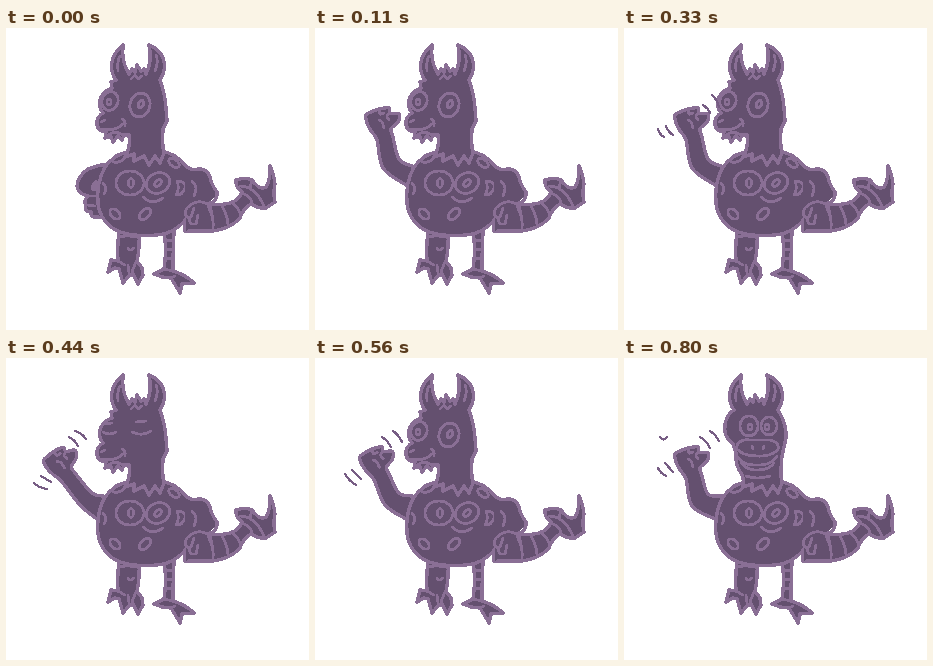
Write an HTML page that moves like this. It is 303 px wide and 302 px high and loops after 890 ms.

```html
<!DOCTYPE html>
<html lang="en">
<head>
<meta charset="utf-8">
<title>Waving creature</title>
<style>
html, body { margin: 0; width: 100%; height: 100%; overflow: hidden; background: #fff; }
svg { display: block; width: 100vw; height: 100vh; }
path, ellipse { fill: #64506f; stroke: #8a6f95; stroke-width: 3.4; stroke-linejoin: round; stroke-linecap: round; }
.line, .ring { fill: none; stroke-width: 2.8; }
.tick { fill: none; stroke: #775d84; stroke-width: 2.3; }
</style>
</head>
<body>
<svg viewBox="0 0 303 302" shape-rendering="crispEdges">
  <!-- tail -->
  <path d="M179 203H207Q224 201 234 190Q238 179 245 176Q253 181 260 180L269 174Q267 165 269 156Q268 146 264 138Q265 151 260 159Q254 163 246 152Q239 149 230 152Q229 159 236 164Q233 172 224 175Q212 178 200 176L179 186Z"/>
  <path class="line" d="M204 178Q208 191 207 202M216 178Q222 188 222 197M227 175Q234 182 235 188M236 165Q246 169 246 176M234 158Q249 158 258 178M246 152L244 160"/>
  <!-- legs -->
  <path d="M113 203Q111 220 112 233L105 232L102 244L109 240L113 241L117 255L123 248L127 246L132 256L137 247L136 240L131 233Q134 220 133 203Z"/>
  <path class="line" d="M112 209Q121 207 133 209M122 220Q124 224 128 220M112 233L119 237M126 244L130 234M122 237L123 245"/>
  <path d="M158 203Q161 222 158 241L148 246L156 249L165 250L174 265L176 256L188 255Q180 247 167 243Q167 222 168 203Z"/>
  <path class="line" d="M160 212L167 213M160 221L167 222M159 230L167 231M158 241L167 243M165 250L169 248"/>
  <!-- left arm -->
  <g id="hip">
    <path fill-rule="evenodd" d="M101 136Q92 137 82 141Q72 148 71 158Q72 166 82 168Q77 173 80 177Q78 184 85 184Q84 190 91 189L99 190ZM90 154Q86 157 87 161Q90 163 91 159Z"/>
    <path class="line" d="M82 168L91 168M81 177L89 178"/>
  </g>
  <g id="wave">
    <path id="arm"/>
    <path id="palm" class="line"/>
  </g>
  <!-- body -->
  <path d="M124 123Q107 127 99 139Q90 155 92 176Q95 196 114 204Q133 210 158 206Q177 200 184 184Q190 156 180 138Q170 125 154 123Z"/>
  <ellipse class="ring" cx="124" cy="155" rx="14" ry="12"/>
  <ellipse class="ring" cx="125" cy="155" rx="2.5" ry="4.5"/>
  <ellipse class="ring" cx="152" cy="155" rx="12" ry="10" transform="rotate(-25 152 155)"/>
  <ellipse class="ring" cx="152" cy="155" rx="4" ry="2.5" transform="rotate(-45 152 155)"/>
  <ellipse class="ring" cx="109" cy="186" rx="6" ry="4" transform="rotate(45 109 186)"/>
  <ellipse class="ring" cx="139" cy="186" rx="7" ry="4" transform="rotate(-45 139 186)"/>
  <ellipse class="ring" cx="113" cy="130" rx="7" ry="3.5" transform="rotate(-28 113 130)"/>
  <ellipse class="ring" cx="168" cy="135" rx="6" ry="3.5" transform="rotate(35 168 135)"/>
  <path class="line" d="M137 169Q146 178 157 170M97 155Q102 160 98 166M171 153Q180 153 179 160Q176 168 170 167Q174 160 171 153Z"/>
  <!-- right arm -->
  <path stroke="none" style="stroke:none" d="M179 139L200 142L211 166L202 176L190 195L180 203Z"/>
  <path style="fill:none" d="M180 138Q185 143 192 141Q201 140 204 149Q205 156 211 164Q212 173 202 176"/>
  <path class="line" d="M186 153Q193 159 188 168M202 176Q190 170 181 180Q176 188 184 190M184 190Q182 197 190 196L192 187M202 177L206 188M188 180L185 189"/>
  <!-- head -->
  <path id="head"/>
  <path class="line" d="M112 43Q111 33 114 28M149 43Q153 34 150 27"/>
  <g id="side">
    <path class="line" d="M95 94L99 92M92 101Q110 104 117 96M116 91Q120 93 119 98M102 107Q110 101 118 108M125 51L129 47L132 51L136 48"/>
    <g id="open">
      <ellipse class="ring" cx="104" cy="73" rx="8" ry="9.5" transform="rotate(20 104 73)"/>
      <ellipse class="ring" cx="103" cy="74" rx="2" ry="3"/>
      <ellipse class="ring" cx="134" cy="77" rx="10" ry="12" transform="rotate(15 134 77)"/>
      <ellipse class="ring" cx="135" cy="76" rx="2.5" ry="4" transform="rotate(20 135 76)"/>
    </g>
    <path id="shut" class="line" d="M97 74Q103 78 110 74M126 74Q136 79 145 73M99 66L106 65M130 64L140 63"/>
  </g>
  <g id="front">
    <ellipse class="ring" cx="125" cy="68" rx="9" ry="10"/>
    <ellipse class="ring" cx="145" cy="68" rx="8" ry="9"/>
    <ellipse class="ring" cx="126" cy="69" rx="2" ry="3"/>
    <ellipse class="ring" cx="143" cy="69" rx="2" ry="3"/>
    <path class="line" d="M112 90Q115 80 126 82L146 82Q156 84 154 92Q146 99 133 98Q118 98 112 90M128 88L129 91M140 88L139 91M113 98Q119 108 133 107Q147 108 153 98M117 105Q124 113 134 112Q145 112 150 105M122 118Q133 122 146 118"/>
  </g>
  <path id="ticks" class="tick"/>
</svg>
<script>
const $ = id => document.getElementById(id);
const LOOP = 890;

const crown = "M110 52C104 44 102 29 117 17C116 28 117 36 123 46L126 41L129 44L131 37L135 43L138 41L140 46C144 38 146 30 143 17C156 22 164 36 154 52";
const mane = "Q156 118 158 125L154 135L149 128L143 137L138 128L128 133L128 126L119 129";
const sideHead = crown + "Q159 65 160 80L161 93L157 101" + mane +
  "Q125 119 123 107L118 107L116 112L112 108L107 114L105 109L99 110L100 104Q90 103 91 93Q92 88 97 85Q91 78 95 69Q99 62 106 60L105 54Z";
const frontHead = crown + "Q163 66 162 80L158 98" + mane +
  "Q121 119 115 112Q111 104 112 95L109 86Q99 79 101 66Q103 56 110 52Z";

// wrist, hand angle, outer and inner elbow, motion marks
const poses = [
  { at: 0 },
  { at: 110, wrist: [70, 112], turn: 0, outer: [68, 140], inner: [84, 131] },
  { at: 220, wrist: [67, 112], turn: -13, outer: [71, 140], inner: [84, 127],
    ticks: "M70 68Q76 71 79 78M79 62Q85 65 88 71M33 107Q36 112 42 115M39 103L48 111" },
  { at: 330, wrist: [70, 112], turn: 0, outer: [68, 140], inner: [84, 131],
    ticks: "M34 101Q35 106 40 109M42 98Q44 104 49 107M79 77Q84 80 86 85M88 67Q93 71 95 79" },
  { at: 440, wrist: [63, 121], turn: -17, outer: [74, 147], inner: [86, 135], shut: true,
    ticks: "M63 79Q69 82 72 88M69 73Q76 75 80 81M28 125Q33 130 41 131M35 118L45 124" },
  { at: 560, wrist: [67, 121], turn: -8, outer: [70, 147], inner: [84, 135],
    ticks: "M67 79Q73 83 76 89M78 73Q84 77 87 84M30 116Q34 123 41 127M37 112L46 121" },
  { at: 670, wrist: [70, 121], turn: 0, outer: [68, 148], inner: [84, 136], front: true,
    ticks: "M76 79Q83 83 86 90M86 73Q92 77 95 83M34 110Q36 115 42 118M41 105L49 114M36 79Q39 84 43 79" }
];

const hand = [[-8, 0], [-14, -9], [-18, -17], [-19, -25], [-14, -28], [-6, -31],
  [4, -32], [5, -27], [14, -26], [13, -18], [6, -11], [8, -3]];
const creases = [[[-6, -31], [-5, -26], [-1, -27]], [[-6, -20], [-3, -18], [-1, -12]], [[5, -27], [2, -24], [4, -20]]];

const show = (id, on) => $(id).style.display = on ? "" : "none";

function place({ wrist: [x, y], turn }) {
  const a = turn * Math.PI / 180, c = Math.cos(a), s = Math.sin(a);
  return ([u, v]) => [x + u * c - v * s, y + u * s + v * c];
}

// smooth curve through every point
function curve(pts) {
  const at = i => pts[Math.max(0, Math.min(pts.length - 1, i))];
  const ease = (p, a, b) => p.map((v, k) => v + (b[k] - a[k]) / 6);
  return "M" + pts[0] + pts.slice(1).map((p, i) =>
    `C${ease(at(i), at(i - 1), p)} ${ease(p, at(i + 2), at(i))} ${p}`).join("");
}

function draw(p) {
  const waving = !!p.wrist;
  show("hip", !waving);
  show("wave", waving);
  show("side", !p.front);
  show("front", p.front);
  show("open", !p.shut);
  show("shut", p.shut);
  $("head").setAttribute("d", p.front ? frontHead : sideHead);
  $("ticks").setAttribute("d", p.ticks || "");
  if (!waving) return;
  const put = place(p);
  const drop = p.wrist[1] > 115 ? 4 : 0;
  $("arm").setAttribute("d", curve([[99, 160 + drop], [91, 157 + drop], p.outer, ...hand.map(put), p.inner, [97, 138], [104, 139]]) + "Z");
  $("palm").setAttribute("d", creases.map(line => curve(line.map(put))).join(""));
}

let current;
function tick() {
  const t = performance.now() % LOOP;
  const p = poses.filter(q => q.at <= t).pop();
  if (p !== current) draw(current = p);
  requestAnimationFrame(tick);
}
tick();
</script>
</body>
</html>
```
